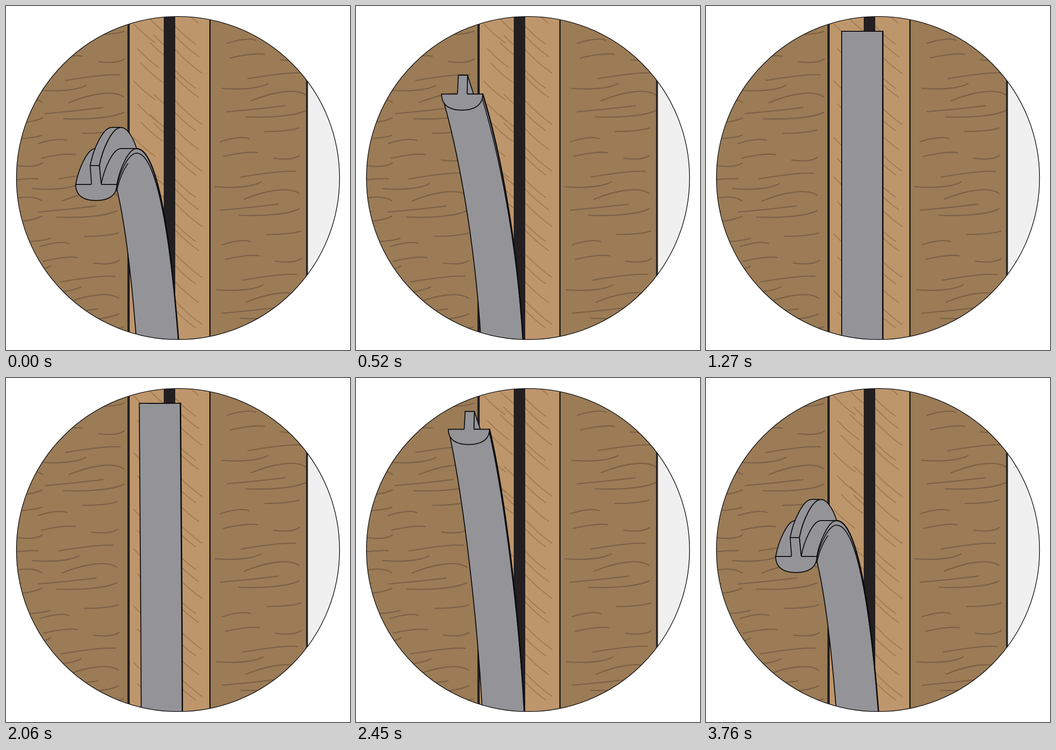
These frames come from a looping animation (748x748 px, 3.79 s). An HTML page with a canvas:

```html
<!DOCTYPE html>
<html lang="en">
<head>
<meta charset="utf-8">
<title>Fitting a seal</title>
<style>
html, body { margin: 0; width: 100%; height: 100%; overflow: hidden; background: #fff; }
canvas { display: block; width: 748px; height: 748px; }
</style>
</head>
<body>
<canvas id="stage" width="748" height="748"></canvas>
<script>
const ctx = document.getElementById('stage').getContext('2d');
const LOOP = 3790, MOVE = 1080, UNBEND = 30, BEND = 1980;
const INK = '#0d0c0d', GREY = '#939398', DARK = '#231f20', WOOD = '#9b7c56';
const WIDTH = 89.5, BOTTOM = 725;

const clamp = x => Math.max(0, Math.min(1, x));
function smooth(from, to, x) {
  const s = clamp((x - from) / (to - from));
  return s * s * (3 - 2 * s);
}

function box(x0, x1, color) {
  ctx.fillStyle = color;
  ctx.fillRect(x0, 0, x1 - x0, 748);
}

function draw(path, fill, width = 2, color = INK) {
  const p = new Path2D(path);
  if (fill) { ctx.fillStyle = fill; ctx.fill(p); }
  if (width) { ctx.lineWidth = width; ctx.strokeStyle = color; ctx.stroke(p); }
}

// One cluster of grain strokes: x, y, length, bulge
const CLUSTER = [
  [167, 277, 74, 0], [70, 299, 62, -7], [77, 331, 74, -6],
  [186, 335, 56, 3], [115, 376, 118, -7], [58, 397, 101, 3],
  [122, 424, 119, -17], [70, 448, 126, -4], [110, 459, 131, 2]
];
const ROWS = [[15, -214], [0, 0], [4, 224], [15, 428]];

function makeGrain() {
  const stroke = (x, y, w, b) =>
    `M${x} ${y}c${w * .35} ${b} ${w * .8} ${b * 1.5 - w * .03} ${w} ${-w * .105}`;
  const cluster = (dx, dy) => CLUSTER.map(([x, y, w, b]) => stroke(x + dx, y + dy, w, b)).join('');
  return new Path2D(ROWS.map(([x, y], i) =>
    cluster(x, y) + cluster(x + 396, y - 4) + cluster(x - 177 + 14 * i, y + 12)).join(''));
}

// Slanted strokes of the light boards, repeating down the length
function makeSlants() {
  const stroke = (x, y, w) => `M${x} ${y}q${w * .48} ${w * .52} ${w} ${w * .88}`;
  let path = 'M400 23q10 6 17 14';
  for (const dy of [0, 333]) {
    [44, 65, 95, 140, 154, 206, 232, 267, 308, 328]
      .forEach((y, i) => path += stroke(368, y + dy, 44 + 7 * (i % 3)));
    [39, 93, 125, 163, 213, 253, 286, 332]
      .forEach((y, i) => path += stroke(278 + 8 * (i % 3), y + dy, 46));
    [29, 64, 80, 192, 236, 255]
      .forEach((y, i) => path += stroke(314 + 8 * (i % 2), y + dy, 34));
  }
  return new Path2D(path);
}

const grain = makeGrain(), slants = makeSlants();

function drawWood() {
  box(0, 264, WOOD);
  box(445, 653, WOOD);
  ctx.lineCap = 'round';
  draw(grain, null, 2.6, '#7d6146');
  box(264, 443, '#be966c');
  draw(slants, null, 2.4, '#a27c53');
  box(264, 269, DARK);
  box(343, 368, DARK);
  box(442, 445, DARK);
  box(656, 748, '#f0f0f0');
  box(652.5, 656.5, DARK);
}

// Geometry of the seal: u = 0 lies flat, u = 1 is folded over
function sealAt(u) {
  const lean = smooth(0, .57, u);
  const drop = smooth(.275, .89, u);
  const arch = smooth(.55, .92, u);
  const turn = smooth(.05, .5, u);
  const end = [384.5 - 109.5 * lean - 34 * Math.sqrt(arch), 55 + 333 * drop];
  const crest = [end[0] + 43 * arch, end[1] - 78 * arch];
  const foot = [384.5 - 21.5 * lean + 12 * arch, BOTTOM];
  const tip = [end[0] - 33 - 5 * arch, end[1] - 41 * turn];
  return {
    arch, turn, end, crest, foot, tip,
    c1: [crest[0] + 36 * lean, crest[1] + (215 - 100 * lean) * (1 - arch)],
    c2: [foot[0] - 14 * lean - 9 * arch, BOTTOM - 225 - 70 * arch],
    peak: [tip[0] + 47 * arch, tip[1] - 83 * arch],
    heel: [crest[0] - 20 * (1 - arch), crest[1]],
    depth: 35 * turn,
    rim: 10 * Math.min(1, 2.5 * drop)
  };
}

function curve(p, q, ax, ay, bx, by) {
  const dx = q[0] - p[0], dy = q[1] - p[1];
  return `C${p[0] + ax * dx} ${p[1] + ay * dy} ${p[0] + bx * dx} ${p[1] + by * dy} ${q}`;
}
const rise = (p, q) => curve(p, q, .15, .45, .6, 1);
const sink = (p, q) => curve(p, q, .4, 0, .85, .55);
const left = (p, d) => [p[0] - d, p[1]];

function drawBody({ arch, turn, end, crest, foot, c1, c2, rim }) {
  const edge = `M${crest}C${c1} ${c2} ${foot}V748`;
  const w = WIDTH + 2 * turn, far = left(crest, WIDTH);
  const farEdge = `C${left(c2, w)} ${left(c1, w)} ${far}`;
  draw(`${edge}H${foot[0] - w}V${BOTTOM}${farEdge}Z`, GREY, 0);
  draw(`M${foot[0] - w} 748V${BOTTOM}${farEdge}`);
  draw(edge, null, 3);
  if (rim < .5) return;

  const inner = [crest[0] - 1 + arch, crest[1] + rim];
  draw(`M${inner}C${c1[0] - 2} ${c1[1] + rim} ${c2[0] - 1} ${c2[1]} ${foot}`, null, 1.8);
  if (arch > .05) {
    const low = [end[0], end[1] + rim / 2];
    draw(`M${low}${rise(low, inner)}`, null, 1.8);
    draw(`M${end[0]} ${end[1] + 14 * arch}q${7 * arch} ${-35 * arch} ${24 * arch} ${-59 * arch}`, null, 1.8);
  }
}

function drawHead({ arch, turn, end, crest, tip, peak, heel, depth }) {
  const corner = left(end, WIDTH), far = left(crest, WIDTH);
  const base = left(end, 34), ridge = left(crest, 34);
  if (arch > .005) {
    draw(`M${corner}${rise(corner, far)}L${crest}${sink(crest, end)}Z`, GREY);
  }
  if (turn > .015) {
    const tipL = left(tip, 20), peakL = left(peak, 20);
    const fall = curve(peak, heel, .33 + .1 * arch, .33 * (1 - arch), .67 + .15 * arch, .67 - .12 * arch);
    draw(`M${tip}${rise(tip, peak)}${fall}L${ridge}${sink(ridge, base)}Z`, GREY);
    draw(`M${tipL}${rise(tipL, peakL)}L${peak}${sink(peak, tip)}Z`, GREY);
    draw(`M${left(end, 55)}L${tipL}L${tip}L${base}Z`, GREY);
  }
  const [x, y] = corner;
  draw(`M${corner}C${x} ${y + depth * .75} ${x + 20} ${y + depth} ${x + 44} ${y + depth}`
    + `S${end[0]} ${y + depth * .75} ${end}Z`, GREY);
  // the stem grows out of the profile without a seam
  if (turn > .07) draw(`M${x + 36} ${y}H${end[0] - 35.5}`, null, 3, GREY);
}

function bendAt(t) {
  return t < BEND ? 1 - clamp((t - UNBEND) / MOVE) : clamp((t - BEND) / MOVE);
}

const lens = new Path2D();
lens.arc(374, 374, 351.3, 0, Math.PI * 2);

function render(t) {
  const seal = sealAt(bendAt(t));
  box(0, 748, '#fff');
  ctx.save();
  ctx.clip(lens);
  ctx.lineJoin = 'round';
  drawWood();
  drawBody(seal);
  drawHead(seal);
  ctx.restore();
  draw(lens, null, 1.6, '#1b1819');
}

const start = performance.now();
function tick() {
  render((performance.now() - start) % LOOP);
  requestAnimationFrame(tick);
}
tick();
</script>
</body>
</html>
```
